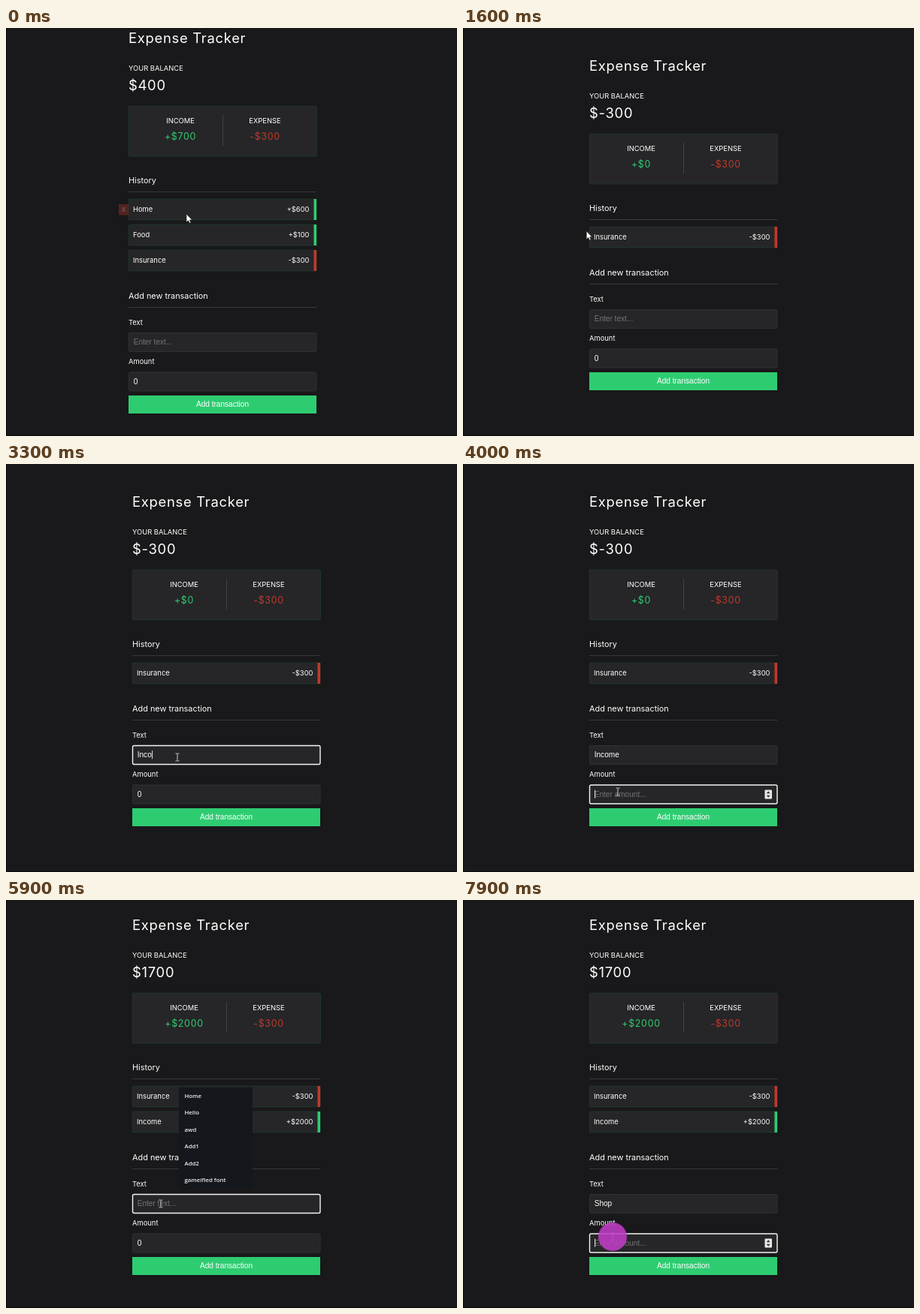
Recreate the animation shown at these times as an HTML page. Size 600 by 544 pixels, loop 8 s.

```html
<!DOCTYPE html>
<html lang="en">
<head>
<meta charset="utf-8">
<title>Expense Tracker</title>
<style>
  html, body { margin: 0; width: 100%; height: 100%; overflow: hidden; background: #19181a; }
  svg { display: block; width: 100%; height: 100%; }
  text { font-family: Inter, sans-serif; white-space: pre; }
  .ui { font-family: "Liberation Sans", Arial, sans-serif; }
  .menu { font-family: "Open Sans", "Noto Sans", sans-serif; font-weight: 600; }
  .wide { letter-spacing: .72px; }
</style>
</head>
<body>
<svg id="stage" viewBox="0 0 600 544"></svg>
<script>
const LOOP = 8000;
const GREEN = '#2ecc71', RED = '#c0392b', PANEL = '#262628', LINE = '#39393b', GREY = '#747476';
const stage = document.getElementById('stage');

// Pointer path: time, x, y
const path = [
  [0, 240, 248], [550, 153, 244], [1000, 153, 244], [1250, 158, 259], [1500, 158, 259],
  [2050, 228, 391], [3550, 228, 391], [3750, 206, 437], [5450, 206, 437],
  [5650, 206, 405], [7500, 206, 405], [7750, 199, 449], [8000, 199, 449]
];
const clicks = [[750, 1000], [1300, 1500], [2100, 2300], [3750, 3950], [5680, 5860], [7800, 8000]];
const suggestions = ['Home', 'Hello', 'awd', 'Add1', 'Add2', 'gameified font'];
const entries = [
  { name: 'Home', sum: 600, from: 0, to: 1000 },
  { name: 'Food', sum: 100, from: 0, to: 1500 },
  { name: 'Insurance', sum: -300, from: 0, to: LOOP },
  { name: 'Income', sum: 2000, from: 4700, to: LOOP }
];

const within = (t, a, b) => t >= a && t < b;
const clamp = v => Math.max(0, Math.min(1, v));
const typed = (word, t, start, step) => word.slice(0, Math.max(0, Math.floor((t - start) / step) + 1));

const rect = (x, y, w, h, fill, more = '') =>
  `<rect x="${x}" y="${y}" width="${w}" height="${h}" fill="${fill}" ${more}/>`;

// Text whose capitals are centred on y
const text = (s, x, y, size, { fill = '#fff', anchor = 'start', cls = '' } = {}) =>
  `<text x="${x}" y="${y + size * .364}" font-size="${size}" fill="${fill}" text-anchor="${anchor}" class="${cls}">${s}</text>`;

const panel = (x, y, w, h) =>
  rect(x, y, w, h, PANEL, 'rx="1.5" stroke="#1d4030" stroke-width=".6"');

function pointerAt(t) {
  const i = Math.max(1, path.findIndex(k => k[0] > t));
  const [a, b] = [path[i - 1], path[i]];
  const p = clamp((t - a[0]) / (b[0] - a[0])), e = p * p * (3 - 2 * p);
  return [a[1] + (b[1] - a[1]) * e, a[2] + (b[2] - a[2]) * e];
}

function pointer(t) {
  const [x, y] = pointerAt(t);
  const shape = t < 1980
    ? '<path d="M0 0V11L2.5 8.7L4.2 12.2L6 11.4L4.4 8H7.6Z" fill="#fff" stroke="#111" stroke-width=".6"/>'
    : '<path d="M-2.5-5H-.6L0-4.4L.6-5H2.5M0-4.4V4.4M-2.5 5H-.6L0 4.4L.6 5H2.5" fill="none" stroke="#c8c8c8"/>';
  const halo = clicks.some(c => within(t, ...c))
    ? '<circle r="19" fill="#c03cc6" opacity=".88"/>' : '';
  return `<g transform="translate(${x} ${y})">${shape}${halo}</g>`;
}

function field(x, y, value, hint, focus, caret) {
  const mid = y + 12.7;
  let s = rect(x + .5, y + .5, 249.5, 25, PANEL,
    focus ? 'rx="2" stroke="#f4f4f4" stroke-width="1.4"' : 'rx="1.5" stroke="#303032"');
  s += text(value || hint, x + 6.7, mid, 10.08, { cls: 'ui', fill: value ? '#fff' : GREY });
  if (focus && caret) {
    const w = [...value].reduce((sum, c) =>
      sum + ({ I: .278, S: .667, c: .5, m: .833 }[c] || .556), 0) * 10.08;
    s += rect(x + 7 + w, mid - 5.5, 1, 11, '#ddd');
  }
  return s;
}

function spinner(x, y) {
  return rect(x, y, 9.5, 12, '#e9e9e9', 'rx="1"') +
    `<path d="M${x + 2.2} ${y + 4.7}l2.5-3l2.5 3zM${x + 2.2} ${y + 7.3}l2.5 3l2.5-3z" fill="#333"/>`;
}

function menu(y) {
  return rect(230, y, 98, 135, '#14171b') +
    suggestions.map((s, i) => text(s, 237.5, y + 11.4 + i * 22.4, 7.8, { cls: 'menu', fill: '#eee' })).join('');
}

function summary(x, top, list) {
  const total = sign => list.reduce((sum, e) => sum + (e.sum * sign > 0 ? Math.abs(e.sum) : 0), 0);
  const gain = total(1), loss = total(-1), mid = { anchor: 'middle' };
  return text('Expense Tracker', x, top, 18.4, { cls: 'wide' }) +
    text('YOUR BALANCE', x, top + 40.3, 9.4) +
    text('$' + (gain - loss), x, top + 63.3, 18.4, { cls: 'wide' }) +
    panel(x, top + 91, 250.5, 67) +
    rect(x + 125, top + 103, 1, 41, '#434345') +
    text('INCOME', x + 69, top + 110.3, 9.4, mid) +
    text('EXPENSE', x + 181.5, top + 110.3, 9.4, mid) +
    text('+$' + gain, x + 69, top + 131, 12.4, { fill: GREEN, anchor: 'middle', cls: 'wide' }) +
    text('-$' + loss, x + 181.5, top + 131, 12.4, { fill: RED, anchor: 'middle', cls: 'wide' });
}

function row(e, x, y) {
  return panel(x, y, 250, 28) +
    rect(x + 246.5, y, 3.6, 28, e.sum > 0 ? GREEN : RED) +
    text(e.name, x + 6, y + 13.8, 9.4) +
    text((e.sum > 0 ? '+$' : '-$') + Math.abs(e.sum), x + 240.5, y + 13.8, 9.4, { anchor: 'end' });
}

function removeButton(x, y, opacity) {
  return `<g opacity="${opacity}">` + rect(x - 13, y + 7, 13, 14.5, RED) +
    text('x', x - 6.5, y + 13.5, 10, { anchor: 'middle', cls: 'ui' }) + '</g>';
}

function draw(t) {
  const list = entries.filter(e => within(t, e.from, e.to));
  const n = list.length;
  const x = n === 3 ? 163 : 168;
  const top = [67, 50, 33, 13][n];
  const listY = top + 215, form = listY + 34 * n;

  const onText = within(t, 2100, 3750) || within(t, 5680, 7800);
  const onAmount = within(t, 3750, 5680) || t >= 7800;
  const open = within(t, 2300, 2900) || within(t, 5860, 6600);
  const caret = !open && (t + 200) % 1000 < 600;
  const name = t < 4700 ? typed('Income', t, 2900, 110) : typed('Shop', t, 6600, 160);
  const amount = within(t, 3750, 4700) ? typed('2000', t, 4150, 100) : t >= 7800 ? '' : '0';

  let s = rect(0, 0, 600, 544, '#19181a') + rect(0, 0, 1, 544, '#0a0a0a') + rect(0, 543, 600, 1, '#0a0a0a');
  s += summary(x, top, list);
  s += text('History', x, top + 190, 10.88) + rect(x, top + 205, 250.5, 1, LINE);
  list.forEach((e, i) => s += row(e, x, listY + 34 * i));
  if (t < 1000) s += removeButton(x, listY, clamp(.35 + t / 400));
  else if (t < 1500) s += removeButton(x, listY, clamp((t - 1120) / 250));

  s += text('Add new transaction', x, form + 27, 10.88) + rect(x, form + 42, 250.5, 1, LINE);
  s += text('Text', x, form + 62.6, 9.4) + field(x, form + 76, name, 'Enter text...', onText, caret);
  s += text('Amount', x, form + 115, 9.4) + field(x, form + 128.5, amount, 'Enter amount...', onAmount, caret);
  if (onAmount) s += spinner(x + 233.5, form + 135.5);
  s += rect(x, form + 160, 250, 24, GREEN) +
    text('Add transaction', x + 125, form + 171.8, 10.08, { anchor: 'middle', cls: 'ui' });
  if (open) s += menu(t < 4000 ? 409.5 : 249.8);
  stage.innerHTML = s + pointer(t);
}

const begin = performance.now();
function tick() {
  draw((performance.now() - begin) % LOOP);
  requestAnimationFrame(tick);
}
tick();
</script>
</body>
</html>
```
